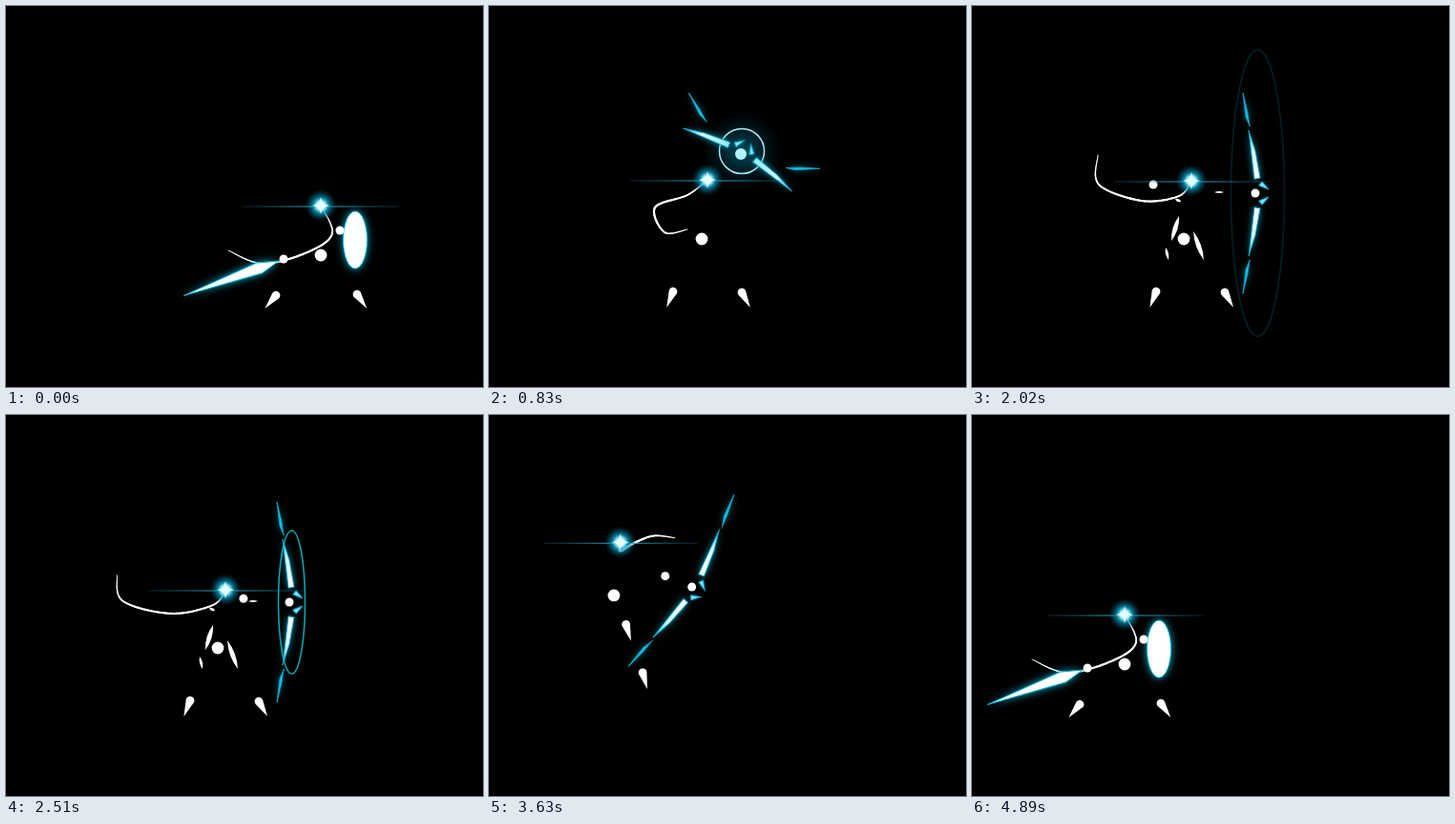
Write an HTML page with a canvas that moves like this. It is 500 by 399 pixels and loops after 5.09 s.

```html
<!DOCTYPE html>
<html lang="en">
<head>
<meta charset="utf-8">
<title>Archer</title>
<style>
html, body { margin: 0; width: 100%; height: 100%; overflow: hidden; background: #000; }
canvas { display: block; }
</style>
</head>
<body>
<canvas id="stage" width="500" height="399"></canvas>
<script>
const c = document.getElementById('stage').getContext('2d');
const LOOP = 5090, STEP = 70, RAD = Math.PI / 180;

const clamp = v => Math.max(0, Math.min(1, v));
const mix = (a, b, u) => Array.isArray(a) ? a.map((v, i) => mix(v, b[i], u)) : a + (b - a) * u;
const shift = (p, dx) => Array.isArray(p[0]) ? p.map(q => shift(q, dx)) : [p[0] + dx, p[1]];

function ease(t, start, end) {
  const u = clamp((t - start) / (end - start));
  return u * u * (3 - 2 * u);
}

// head, hip, sword hand, bow hand, left foot, right foot, points along the scarf
const guard = [[330, 209], [330, 261], [291, 265], [350, 235], [283, 303], [368, 302],
  [[342, 238], [318, 257], [270, 270], [233, 256]]];
const toss = [[229, 182], [223, 244], [264, 155], [264, 155], [193, 299], [265, 300],
  [[208, 198], [174, 211], [184, 237], [208, 234]]];
const aim = [[230, 183], [222, 244], [190, 187], [297, 196], ...toss.slice(4, 6),
  [[217, 199], [178, 204], [133, 187], [132, 156]]];
const dash = [[162, 157], [149, 212], [176, 193], [222, 215], [181, 299], [166, 243],
  [[176, 193], [205, 199], [235, 207], [253, 221]]];
const leap = [[123, 119], [120, 175], [190, 154], [207, 159], [149, 252], [130, 205],
  [[114, 112], [120, 95], [135, 78], [160, 73]]];
const moves = [[200, 760, toss], [830, 1180, aim], [2860, 3070, dash], [3140, 3980, leap],
  [4260, 4750, shift(guard, -170)]];

const poseAt = t => moves.reduce((pose, [start, end, next]) => mix(pose, next, ease(t, start, end)), guard);

function within(draw) { c.save(); draw(); c.restore(); }

function ball(x, y, r) {
  c.beginPath();
  c.arc(x, y, r, 0, 7);
  c.fill();
}

function ring(x, y, rx, ry, tilt = 0, from = 0, to = 360) {
  c.beginPath();
  c.ellipse(x, y, rx, ry, tilt * RAD, from * RAD, to * RAD);
  c.stroke();
}

function polygon(...points) {
  c.beginPath();
  for (let i = 0; i < points.length; i += 2) c.lineTo(points[i], points[i + 1]);
  c.closePath();
}

// a sliver of light, pointed at both ends
function leaf(x1, y1, x2, y2, width) {
  const x = (x1 + x2) / 2, y = (y1 + y2) / 2, k = width / Math.hypot(x2 - x1, y2 - y1);
  const dx = (y2 - y1) * k, dy = (x1 - x2) * k;
  c.beginPath();
  c.moveTo(x1, y1);
  c.quadraticCurveTo(x + dx, y + dy, x2, y2);
  c.quadraticCurveTo(x - dx, y - dy, x1, y1);
  c.fill();
}

// toes point away from the hip; a kick stretches the foot into a streak
function foot([x, y], [hipX, hipY], kick = 0) {
  const away = Math.atan2(y - hipY, (x - hipX) * 0.75);
  const dx = 18 * Math.cos(away) + 52 * kick, dy = 18 * Math.sin(away) + 39 * kick;
  within(() => {
    c.translate(x, y);
    c.rotate(Math.atan2(dy, dx));
    c.beginPath();
    c.arc(0, 0, 4.4 - 1.5 * kick, 1.4, -1.4);
    c.lineTo(Math.hypot(dx, dy), 0);
    c.fill();
  });
}

// smooth curve through the points, thin at both ends
function scarf(points) {
  const at = i => points[Math.max(0, Math.min(points.length - 1, i))];
  const spans = points.length - 1, parts = 16 * spans;
  let last = points[0];
  for (let n = 1; n <= parts; n++) {
    const s = n / parts * spans, i = Math.min(spans - 1, Math.floor(s)), u = s - i;
    const next = [0, 1].map(k => {
      const [p, q, r, w] = [i - 1, i, i + 1, i + 2].map(j => at(j)[k]);
      return q + u / 2 * (r - p + u * (2 * p - 5 * q + 4 * r - w + u * (3 * (q - r) + w - p)));
    });
    c.lineWidth = 0.7 + 1.5 * Math.sin(Math.PI * n / (parts + 1));
    c.beginPath();
    c.moveTo(...last);
    c.lineTo(...next);
    c.stroke();
    last = next;
  }
}

function glowing(fill, edge, blur) {
  within(() => {
    c.shadowColor = edge;
    c.shadowBlur = blur;
    c.fillStyle = fill;
    c.fill();
    c.shadowBlur = 0;
    c.strokeStyle = edge;
    c.lineWidth = 0.9;
    c.stroke();
  });
}

function bowArm(apart, gold) {
  const golden = gold > 0.5;
  const edge = golden ? '#8a5c14' : '#0ba3c4', tip = golden ? '#e3c455' : '#1cbfe0';
  const shine = c.createLinearGradient(0, -14, 0, -67);
  shine.addColorStop(0, apart > 0.5 ? '#8feaff' : '#fff');
  shine.addColorStop(0.6, golden ? '#fff3a6' : '#d6faff');
  shine.addColorStop(1, tip);
  within(() => {
    c.globalAlpha = gold;
    c.shadowColor = '#7a3000';
    c.shadowBlur = 22;
    c.strokeStyle = '#211000';
    c.lineWidth = 12;
    c.beginPath();
    c.moveTo(2, -10);
    c.lineTo(-12, -102);
    c.stroke();
  });
  polygon(5, -16, 0, -44, -7, -66, -1, -15);
  glowing(shine, edge, 7);
  polygon(7 - 9 * gold, -12, 14 - 9 * gold, -4, 4 - 5 * gold, -8);
  glowing(golden ? '#ffe68a' : '#7ee4f8', edge, 3);
  c.translate(-6 + 17 * apart, -70 + 22 * apart);
  c.rotate(40 * apart * RAD);
  polygon(0, 0, -2, -14, -7, -35, -4, -10);
  glowing(tip, edge, 6);
}

function bow(x, y, t) {
  const apart = 1 - ease(t, 830, 1110), gold = ease(t, 3560, 3980) - ease(t, 4260, 4480);
  const turn = -130 + 70 * ease(t, 690, 830) + 60 * ease(t, 830, 1110) +
    33 * ease(t, 2860, 3070) - 19 * ease(t, 3560, 3980) - 34 * ease(t, 4260, 4480);
  const drawn = t >= 3000 && t < 3560;
  within(() => {
    c.translate(x, y);
    c.rotate(turn * RAD);
    c.scale(1 + 0.11 * gold, 1 + 0.11 * gold);
    for (const side of [1, -1]) within(() => {
      c.scale(1, side);
      if (drawn) c.rotate(-3.4 * RAD);
      bowArm(apart, gold);
    });
    if (drawn) {
      polygon(-4, 2, -46, 6, -20, 6);
      glowing('#bff6ff', '#0ba3c4', 4);
    }
  });
}

function sword(x, y, angle) {
  within(() => {
    c.translate(x, y);
    c.rotate(angle * RAD);
    polygon(0, 0, 21, -6, 106, 0, 23, 6);
    glowing('#fff', '#08bfe0', 8);
  });
}

function shield(x, y, size) {
  c.beginPath();
  c.ellipse(x, y, 12.5 * size, 30 * size, 0, 0, 7);
  glowing('#fff', '#08bfe0', 8);
}

function tossHalo(x, y) {
  const glow = c.createRadialGradient(x, y, 5, x, y, 42);
  glow.addColorStop(0, 'rgba(0,120,145,.55)');
  glow.addColorStop(1, 'rgba(0,60,80,0)');
  c.fillStyle = glow;
  ball(x, y, 42);
  c.strokeStyle = '#a5edf5';
  c.lineWidth = 1.5;
  ring(x, y, 23.5, 23.5);
}

function shotRing(age) {
  const size = 1 - 0.5 * (1 - age) ** 2;
  within(() => {
    c.globalAlpha = 1 - 0.8 * age;
    c.strokeStyle = '#08a5ae';
    c.lineWidth = 1.6;
    ring(299.5, 196, 28 * size, 150 * size);
  });
}

function goldRings(t) {
  const size = Math.min(1, 0.72 + (t - 4050) / 500);
  within(() => {
    c.globalAlpha = clamp((4470 - t) / 240);
    c.strokeStyle = '#d95f08';
    c.lineWidth = 2;
    for (const [from, to] of [[99, 200], [210, 295], [-36, 73]])
      ring(225, 158.5, 33.5 * size, 148 * size, 14, from, to);
    for (const [from, to] of [[146, 300], [-26, 72]])
      ring(254, 167, 22.5 * size, 93 * size, 14, from, to);
  });
}

// the shots light up the edges of the dark body
function aimLight() {
  leaf(217, 220, 209, 246, 5);
  leaf(232, 236, 243, 266, 5);
  leaf(203, 253, 206, 266, 3);
  leaf(254, 195, 264, 195, 2);
  leaf(213, 202, 219, 205, 3);
}

function leapLight() {
  leaf(108, 137, 134, 134, 17);
  for (let i = 0; i < 3; i++) leaf(103 + 6 * i, 161 + 19 * i, 138, 196 + 13 * i, 21 / (1 + i));
  leaf(75, 110, 86, 126, 8);
  leaf(181, 153, 201, 158, 4);
  leaf(145, 246, 157, 277, 9);
}

function star(x, y) {
  const line = c.createLinearGradient(x - 82, 0, x + 82, 0);
  line.addColorStop(0, 'rgba(20,110,130,.25)');
  line.addColorStop(0.5, 'rgba(50,190,215,.9)');
  line.addColorStop(1, 'rgba(20,110,130,.25)');
  c.fillStyle = line;
  c.fillRect(x - 81, y + 0.4, 163, 1.2);
  const glow = c.createRadialGradient(x, y, 1, x, y, 17);
  glow.addColorStop(0, '#fff');
  glow.addColorStop(0.25, '#8feaff');
  glow.addColorStop(0.45, 'rgba(12,165,200,.75)');
  glow.addColorStop(1, 'rgba(0,70,95,0)');
  c.fillStyle = glow;
  ball(x, y, 17);
  c.fillStyle = '#e8fdff';
  c.beginPath();
  c.moveTo(x, y - 9);
  for (const [dx, dy] of [[9, 0], [0, 9], [-9, 0], [0, -9]])
    c.quadraticCurveTo(x + (dx + dy) * 0.1, y + (dy - dx) * 0.1, x + dx, y + dy);
  c.fill();
}

function draw(t) {
  const [head, hip, hand, grip, left, right, cloth] = poseAt(t);
  const sway = t >= 1320 && t < 2930 ? Math.sin(Math.PI * (t - 1320) / 700) ** 2 : 0;
  const shots = t >= 1110 && t < 2860, age = (t - 1110) % 700 / 210;
  const flash = t >= 4050 && t <= 4260, armed = t < 725 || t > 4480, tossed = !armed && t < 970;
  cloth.forEach((p, i) => { p[0] -= 8 * i * sway; p[1] += 6 * i * sway; });
  hand[0] += 90 * sway;
  hand[1] += 8 * sway;

  c.fillStyle = '#000';
  c.fillRect(0, 0, 500, 399);
  if (shots && age <= 1) shotRing(age);
  if (t >= 4050 && t < 4470) goldRings(t);

  c.fillStyle = c.strokeStyle = '#fff';
  c.lineCap = 'round';
  scarf([head, ...cloth]);
  if (flash) leapLight();
  else {
    ball(...hip, 6.4);
    foot(left, hip);
    foot(right, hip, ease(t, 2860, 3070) - ease(t, 3140, 3400));
    if (shots && age <= 1.34) aimLight();
  }
  if (t >= 3000 && t <= 3140) {
    c.lineWidth = 1.3;
    ring(271, 246, 14, 15, 0, -20, 115);
  }

  if (armed) {
    sword(hand[0] - 5, hand[1] + 2, 160 + 130 * (ease(t, 200, 720) - ease(t, 4480, 4750)));
    const joined = t < 725 ? clamp((t - 200) / 525) : 0;
    const grown = t > 4480 ? clamp((t - 4480) / 220) : 1;
    shield(grip[0] + 16 - 15 * joined, grip[1] + 10 - 13 * joined, grown);
  } else {
    if (tossed) tossHalo(grip[0] + 1, grip[1] - 3);
    bow(...grip, t);
  }

  if (!flash) {
    c.fillStyle = tossed ? '#b5f3fb' : '#fff';
    ball(...hand, 4.5);
    ball(...grip, tossed ? 6 : 4.5);
  }
  star(...head);
}

function tick(now) {
  const t = now % LOOP;
  draw(t < 200 ? 0 : Math.min(4890, 200 + Math.floor((t - 200) / STEP) * STEP));
  requestAnimationFrame(tick);
}
requestAnimationFrame(tick);
</script>
</body>
</html>
```
